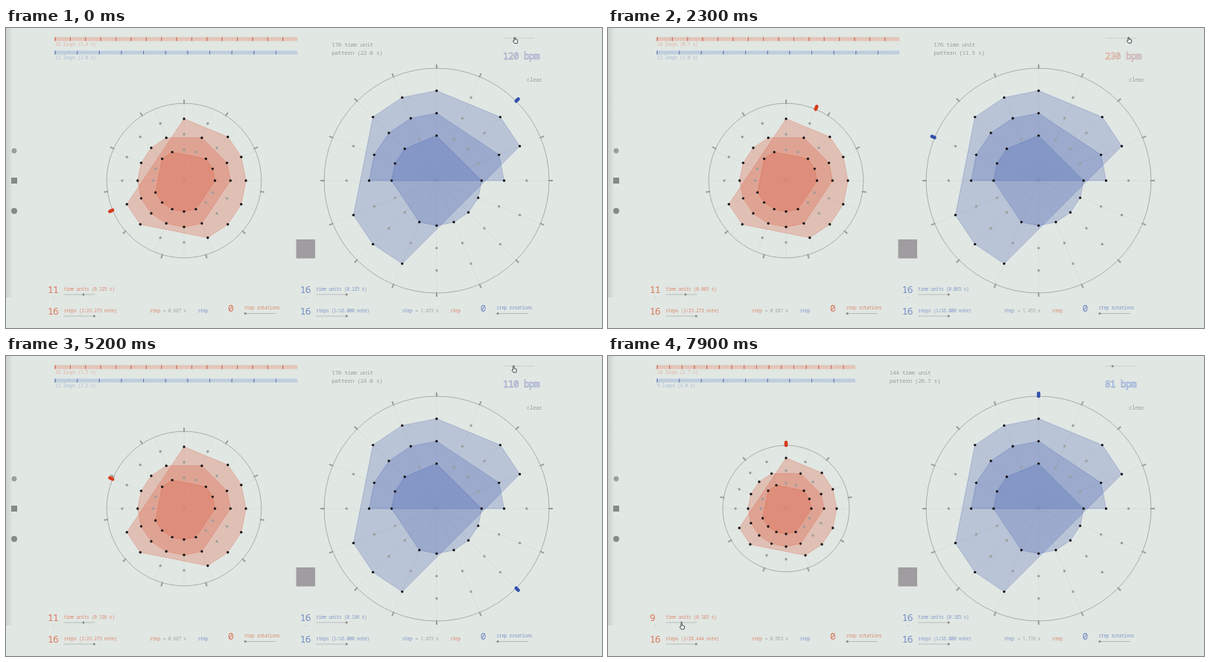
An HTML page that plays this animation: 800 px wide and 403 px high, repeating every 8 s.

```html
<!DOCTYPE html>
<html lang="en">
<head>
<meta charset="utf-8">
<title>Polyrhythm dials</title>
<style>
  html, body { margin: 0; width: 100%; height: 100%; overflow: hidden; background: #e1e7e3; }
  svg { display: block; width: 800px; height: 403px; }
  text { font-family: "Noto Sans Mono", "DejaVu Sans Mono", monospace; letter-spacing: -.05em; white-space: pre; }
</style>
</head>
<body>
<svg id="stage" viewBox="0 0 800 403"></svg>
<script>
const LOOP = 8000, TICK = 100, UNIT_PX = 1.853, STEPS = 16;
const GREY = '#999e9b';

// [time in ms, tempo]
const TEMPO = [[0, 120], [500, 120], [1600, 208], [2300, 230], [3100, 234], [3400, 246],
  [4200, 246], [5000, 110], [5250, 110], [5700, 81], [LOOP, 81]];
const CURSOR_Y = [[0, 16.5], [4200, 16], [5000, 18], [LOOP, 18]];
const RESTARTS = [5750, 7500, 7850];

const RED = {
  x: 239, fill: '#da5032', hand: '#d63a1c', number: '#da7357', label: '#dc8a73',
  pale: '#e2b3a4', tick: '#e5a895', beat: '#c4573b',
  rings: [[0, 2, 3, 4, 5, 6, 7, 10, 11],
    [1, 3, 4, 7, 8, 9, 10, 11, 12, 13, 14, 15],
    [2, 3, 4, 7, 8, 9, 10, 11, 14, 15]]
};
const BLUE = {
  x: 578, fill: '#445fb2', hand: '#3450ab', number: '#7088c6', label: '#8397c8',
  pale: '#abbcd8', tick: '#a3b7d8', beat: '#4b68a6',
  rings: [[0, 2, 3, 9, 10, 11, 14, 15],
    [0, 3, 4, 12, 13, 14, 15],
    [0, 4, 5, 6, 7, 8, 9, 12, 13, 14]]
};

const clamp = v => Math.max(0, Math.min(1, v));
const lerp = (a, b, u) => a + (b - a) * u;
const smooth = u => u * u * (3 - 2 * u);

function sample(keys, t) {
  const i = Math.max(1, keys.findIndex(k => k[0] >= t));
  const [a, b] = [keys[i - 1], keys[i]];
  return lerp(a[1], b[1], clamp((t - a[0]) / (b[0] - a[0])));
}

// Elapsed time units: the tempo summed since the last restart
function phase(t) {
  const from = RESTARTS.filter(r => r <= t).pop() || 0;
  let units = from ? 0 : 18.8;
  for (let s = from; s < t; s += 50) units += sample(TEMPO, s + 25) / 15 * .05;
  return units;
}

const polar = (x, r, turn) => {
  const a = turn * 2 * Math.PI;
  return [x + r * Math.sin(a), 205 - r * Math.cos(a)].map(v => v.toFixed(2));
};
const line = (x1, y1, x2, y2, color, w, extra = '') =>
  `<line x1="${x1}" y1="${y1}" x2="${x2}" y2="${y2}" stroke="${color}" stroke-width="${w}" ${extra}/>`;
const spoke = (x, r1, r2, turn, ...style) => line(...polar(x, r1, turn), ...polar(x, r2, turn), ...style);
const dot = (x, y, r, color) => `<circle cx="${x}" cy="${y}" r="${r}" fill="${color}"/>`;
const text = (x, y, str, advance, color, extra = '') =>
  `<text x="${x}" y="${y}" font-size="${(advance / .55).toFixed(2)}" fill="${color}" ${extra}>${str}</text>`;
const small = (x, y, str, color) => text(x, y, str, 3.41, color);
const slider = (x, y, knob, color = '#adb2af') =>
  line(x, y, x + 42, y, color, .8) + dot(knob, y, 1.5, '#858a87');

function dial(d, n, step) {
  const r = 151 * n / 16;
  let out = `<circle cx="${d.x}" cy="205" r="${r}" fill="none" stroke="#a3a8a5" stroke-width=".9"/>`;
  for (let i = 0; i < STEPS; i++)
    out += spoke(d.x, 0, r, i / STEPS, '#8f9693', .6, 'stroke-dasharray="1 1" opacity=".35"');
  for (let i = 0; i < n; i++) out += spoke(d.x, r - 1, r + 5, i / n, GREY, 2);

  const radii = [.8, .6, .4].map(k => k * r);
  d.rings.forEach((on, k) => {
    const pts = on.map(i => polar(d.x, radii[k], i / STEPS).join()).join(' ');
    out += `<polygon points="${pts}" fill="${d.fill}" fill-opacity=".255" stroke="${d.fill}" stroke-opacity=".4" stroke-width=".7"/>`;
  });
  d.rings.forEach((on, k) => {
    for (let i = 0; i < STEPS; i++)
      out += dot(...polar(d.x, radii[k], i / STEPS), 1.7, on.includes(i) ? '#161418' : GREY);
  });
  return out + spoke(d.x, r, r + 4, step / STEPS, d.hand, 4.6, 'stroke-linecap="round"');
}

function bar(d, y, n, total, unit) {
  const end = 66 + total * UNIT_PX - 1;
  const dashes = (gap, color) =>
    line(65.5, y, end, y, color, 5.2, `stroke-dasharray="1 ${gap * UNIT_PX - 1}"`);
  return dashes(1, d.tick) + dashes(n, d.beat) +
    small(66, y + 8.8, `${total / n} loops (${(n * unit).toFixed(1)} s)`, d.pale);
}

function panel(d, other, x, n, unit, ratio, knob) {
  return text(x, 355.5, n, 7, d.number) + text(x, 384.5, STEPS, 7, d.number) +
    text(x + 6, 364.5, '+', 3, d.pale) +
    small(x + 21.5, 353, `time units (${unit.toFixed(3)} s)`, d.label) +
    slider(x + 21.5, 358, knob) +
    small(x + 21.5, 382, `steps (1/${(256 / n).toFixed(3)} note)`, d.label) +
    slider(x + 21.5, 387, x + 62.3) +
    small(x + 137, 382, 'step', d.label) +
    small(x + 155, 382, `= ${ratio} x`, '#a3a8a5') +
    small(x + 201.5, 382, 'step', other.label) +
    text(x + 242, 380.8, 0, 7, d.number) +
    small(x + 263.8, 378, 'step rotations', d.label) +
    slider(x + 264, 383.5, x + 265.2);
}

function tempoPanel(bpm, knob) {
  const cool = [158, 176, 219], warm = [224, 178, 160];
  const mix = u => `rgb(${cool.map((c, i) => Math.round(lerp(c, warm[i], u)))})`;
  const u = clamp((bpm - 81) / 127);
  return `<linearGradient id="tempo" gradientUnits="userSpaceOnUse" x1="667" y1="0" x2="716" y2="0">
    <stop stop-color="${mix(u)}"/><stop offset="1" stop-color="${mix(u * .6)}"/></linearGradient>` +
    slider(667.5, 13.7, knob, '#c2c7c4') +
    text(667, 42.3, Math.round(bpm) + ' bpm', 7, 'none', 'stroke="url(#tempo)" stroke-width=".8"') +
    text(699, 72, 'clear', 4.1, GREY);
}

const cursor = (x, y) => `<path transform="translate(${x} ${y})" fill="#f4f6f5" stroke="#33383a" stroke-width=".9"
  stroke-linejoin="round" d="M-1.6 .8V-3.2Q-.8-4.4 0-3.2V-1L2.6-.5Q3.3-.3 3.2.8L2.5 4H-1.2L-3.2 1.2Q-3-.1-1.6.8Z"/>`;

const backdrop = `<linearGradient id="edge"><stop stop-opacity=".1"/><stop offset="1" stop-opacity="0"/></linearGradient>
  <rect width="9" height="362" fill="url(#edge)"/>
  <circle cx="11" cy="165" r="3.4" fill="#9a9f9c"/>
  <rect x="7" y="201" width="8" height="8" fill="#858a87"/>
  <circle cx="11" cy="245.7" r="4" fill="#858a87"/>
  <rect x="389.5" y="284" width="25.5" height="25.5" fill="#a09da0"/>`;

function render(t) {
  const bpm = sample(TEMPO, t), unit = 15 / bpm, units = phase(t);
  const n = t < 7500 ? 11 : t < 7850 ? 10 : 9;
  const total = n * 16 / (n === 10 ? 2 : 1);
  const ratio = { 11: '0.687', 10: '0.625', 9: '0.563' }[n];
  const tempoKnob = 667 + (bpm - 10) / 290 * 42;
  const unitKnob = lerp(104, 98.7, clamp((t - 7350) / 500));
  const travel = smooth(clamp((t - 5850) / 1150));
  const textX = 66 + total * UNIT_PX + 45;

  stage.innerHTML = backdrop +
    bar(RED, 14.8, n, total, unit) + bar(BLUE, 33, 16, total, unit) +
    text(textX, 25, `${total} time unit`, 4.28, GREY) +
    text(textX, 35.7, `pattern (${(total * unit).toFixed(1)} s)`, 4.28, GREY) +
    tempoPanel(bpm, tempoKnob) +
    dial(RED, n, Math.floor(units * STEPS / n) % STEPS) +
    dial(BLUE, 16, Math.floor(units) % STEPS) +
    panel(RED, BLUE, 56, n, unit, ratio, unitKnob) +
    panel(BLUE, RED, 394.8, 16, unit, (16 / n).toFixed(3), 457.1) +
    cursor(lerp(tempoKnob, unitKnob, travel) + .8, lerp(sample(CURSOR_Y, t), 363, travel));
}

const stage = document.getElementById('stage');
const start = performance.now();
let shown = -1;
function play() {
  const t = Math.floor((performance.now() - start) % LOOP / TICK) * TICK;
  if (t !== shown) render(shown = t);
  requestAnimationFrame(play);
}
play();
</script>
</body>
</html>
```
